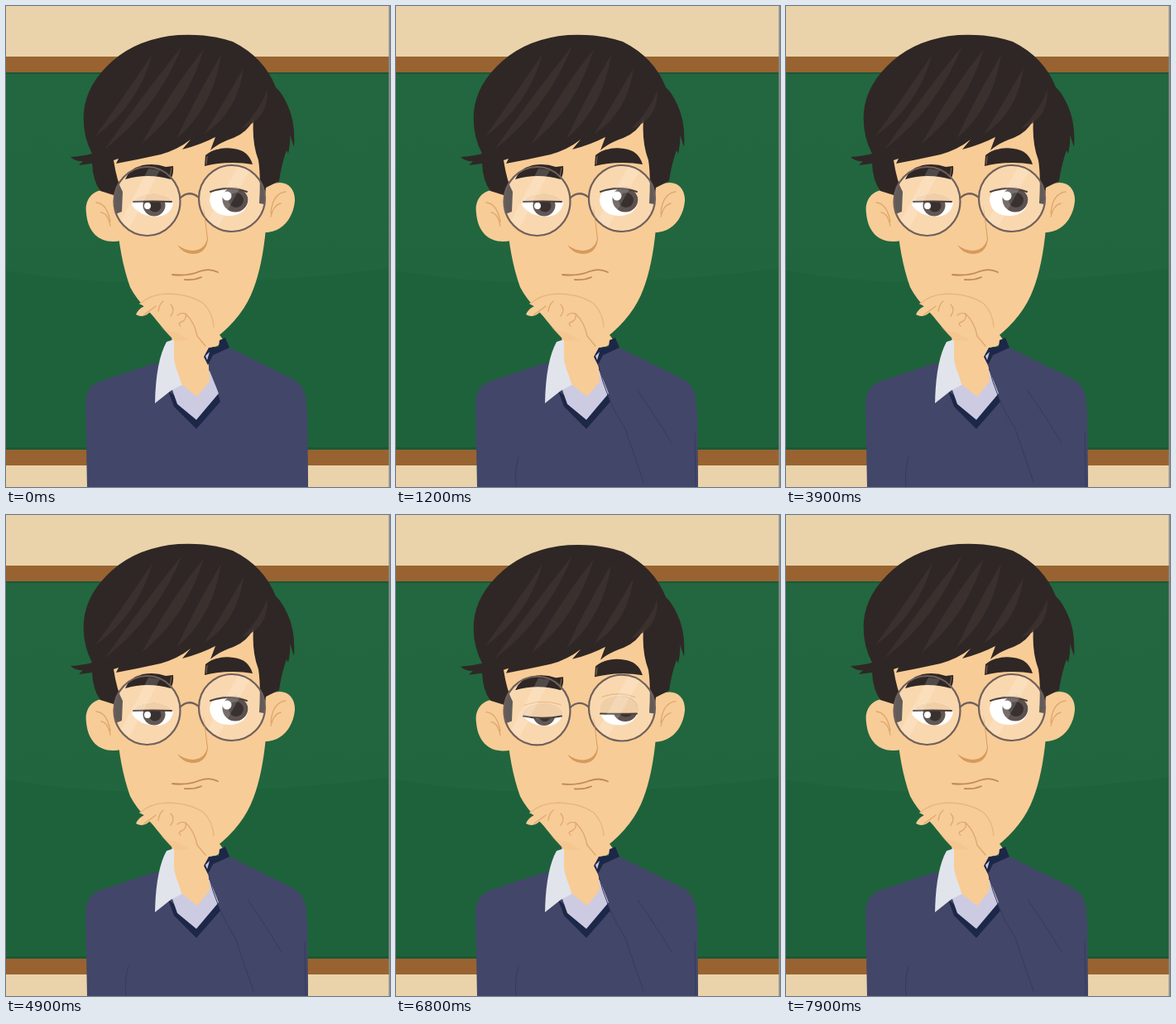
These frames come from a looping animation (464 px wide and 580 px high, 8000 ms). An HTML page:

```html
<!DOCTYPE html>
<html lang="en">
<head>
<meta charset="utf-8">
<title>Thinking</title>
<style>
  html, body { margin: 0; width: 100%; height: 100%; overflow: hidden; background: #ead3aa; }
  svg { display: block; width: 100vw; height: 100vh; }
  .line { fill: none; stroke: #c08a55; stroke-width: 1.8; stroke-linecap: round; stroke-linejoin: round; }
  .soft { stroke: #dfa970; stroke-width: 1.4; }
  .skin { fill: #f8cc96; }
  .hair { fill: #2f2725; }
  .knit { fill: #424669; }
  .navy { fill: #1d2748; }
  .seam { fill: none; stroke: #363a5b; stroke-width: 1; stroke-linecap: round; }
  .lens { fill: #fff; opacity: .24; }
  .rim { fill: none; stroke: #6f605c; stroke-width: 2.2; }
  .glare { fill: #fff; opacity: .16; }
</style>
</head>
<body>
<svg viewBox="0 0 464 580" preserveAspectRatio="none">
  <defs>
    <linearGradient id="board" x2="0" y2="1">
      <stop offset="0" stop-color="#22673f"/>
      <stop offset="1" stop-color="#20643d"/>
    </linearGradient>
    <clipPath id="clipL"><path d="M152 240Q155 227 178 226Q198 227 202 238Q198 255 178 254Q160 252 152 240Z"/></clipPath>
    <clipPath id="clipR"><path d="M246 234Q246 218 269 217Q290 218 293 234Q290 253 269 253Q248 252 246 234Z"/></clipPath>
  </defs>

  <g id="room">
    <path fill="#ead3aa" d="M0 0H464V580H0Z"/>
    <path fill="#986331" d="M0 61H464V80H0ZM0 534H464V554H0Z"/>
    <path fill="url(#board)" d="M0 80H464V535H0Z"/>
    <path fill="#1e623b" d="M0 319Q90 334 180 334Q330 334 464 316V535H0Z"/>
    <path fill="#1c5837" d="M0 80H464V82H0ZM0 532H464V535H0Z"/>
    <path fill="#8b928c" d="M462.500 0H464V580H462.500Z"/>
  </g>

  <g id="body">
    <path class="knit" d="M98 580L96 478Q97 460 112 453L182 430L205 445H243V425L266 411L345 449Q361 457 363 476L365 580Z"/>
    <path class="navy" d="M196 464L203 483L230 510L259 477L252 455L230 490Z"/>
    <path fill="#cccbe2" d="M201 463L206 440H246L257 467L230 499L207 480Z"/>
    <path class="skin" d="M200 385H254L244 420L246 452L231 471L212 456L201 426Z"/>
    <path fill="#e2e4ec" d="M203 402L194 405Q181 428 180 479L199 464L214 456Q204 437 203 425Z"/>
  </g>

  <g id="head">
    <path class="skin" d="M138 226C110 214 94 230 97 250C99 273 113 288 139 283ZM309 223C330 204 350 214 349 235C347 258 331 275 309 273Z"/>
    <path class="line soft" d="M109 237Q122 238 126 260M115 249Q123 250 126 265M338 224Q322 226 320 250M332 238Q323 240 320 254"/>
    <path class="skin" d="M129 170L134 255Q137 303 150 339Q164 366 203 394Q225 405 254 400Q287 374 299 341Q310 312 314 268L312 130L180 120Z"/>
    <path class="hair" d="M104 178Q93 181 78 182Q84 188 93 187L88 192L104 190Q105 211 114 223L130 228L132 251L140 248L141 224Q134 212 130 186L136 184L133 190Q160 185 187 179Q208 173 223 161L213 173Q236 167 253 158L247 174Q257 165 275 159Q292 152 299 137Q297 165 305 186Q308 205 306 238L312 239L314 219L330 211Q333 190 339 174L341 178Q344 164 343 155L348 170Q350 140 340 119Q333 104 326 98Q312 62 274 43Q245 33 208 35Q160 39 129 66Q97 94 94 128Q92 155 104 178Z"/>
    <g id="strands" fill="#3c3230" opacity=".85"></g>

    <ellipse class="lens" cx="170.500" cy="235.500" rx="40" ry="41.500"/>
    <ellipse class="lens" cx="273" cy="232" rx="40" ry="40"/>
    <g id="brows">
      <path class="hair" d="M144 209Q149 196 165 192Q180 189 193 194L202 193Q203 202 199 209Q171 201 144 209Z"/>
      <path class="hair" d="M240 193L241 180Q255 169 275 172Q293 174 298 191Q270 186 240 193Z"/>
      <path fill="none" stroke="#77614e" stroke-width="1.200" d="M243 181L242 191M200 195L198 206"/>
    </g>

    <g clip-path="url(#clipL)">
      <path fill="#fff" d="M140 220H210V260H140Z"/>
      <circle cx="179" cy="240" r="13.500" fill="#635855"/>
      <circle cx="180" cy="241" r="7.500" fill="#383130"/>
      <circle cx="171" cy="241" r="4" fill="#fff"/>
      <path id="lidL" fill="#f0cfa8"/>
    </g>
    <g clip-path="url(#clipR)">
      <path fill="#fff" d="M240 210H300V260H240Z"/>
      <circle cx="277" cy="233" r="15.500" fill="#5d524f"/>
      <circle cx="278" cy="234" r="9" fill="#383130"/>
      <circle cx="267" cy="229" r="5.500" fill="#fff"/>
      <path id="lidR" fill="#f0cfa8"/>
    </g>
    <g fill="none" stroke="#4d403c" stroke-width="2" stroke-linecap="round">
      <path id="lashL"/>
      <path id="lashR"/>
    </g>
    <path id="folds" class="line soft" d="M155 229Q176 221 199 228M249 219Q268 211 289 219"/>

    <path class="glare" d="M172 196L186 198L149 268L139 259ZM281 193L294 199L256 267L244 258Z"/>
    <ellipse class="rim" cx="170.500" cy="235.500" rx="40" ry="41.500"/>
    <ellipse class="rim" cx="273" cy="232" rx="40" ry="40"/>
    <path class="rim" d="M210 232Q221 221 233 231"/>

    <path fill="#d69a5c" d="M238 239Q242 263 244 281Q242 299 225 299Q213 298 207 288Q216 295 226 295Q240 294 243 281Z"/>
    <path class="line" d="M201 324Q220 326 234 320Q246 316 256 321M216 330Q227 331 236 327"/>
  </g>

  <g id="hand">
    <path class="skin" d="M157 372Q160 365 167 362L161 359Q173 348 194 347Q222 347 239 359Q250 370 251 387L262 402Q258 411 250 411L243 415L246 453L231 471L212 456L203 425V403Q190 390 174 369Q166 377 157 372Z"/>
    <path fill="#efba86" opacity=".35" d="M186 386Q195 394 205 393L222 403L204 404Z"/>
    <path class="line soft" opacity=".6" d="M162 359Q174 348 194 347Q222 347 239 359Q250 370 251 387"/>
    <path class="line soft" d="M167 372L181 362M184 368Q185 360 190 356M199 360Q205 366 199 374M207 373Q211 369 217 371Q219 378 212 381Q207 383 211 386M218 372Q228 382 231 398L241 410"/>
  </g>

  <g id="arm">
    <path class="knit" d="M268 411L345 449L364 490L365 580H306Q270 520 258 470L244 428Z"/>
    <path class="navy" d="M258 403L265 400L270 412L250 421L244 433L239 423L245 412L257 411Z"/>
    <path fill="#c8c7e3" d="M246 417L243 427L241 422Z"/>
    <path id="seams" class="seam" d="M244 431Q254 475 277 510L299 574M292 464Q312 492 333 527M145 580Q143 560 148 544M361 515L362 580"/>
  </g>
</svg>

<script>
const LOOP = 8000, STEP = 100;
const BLINKS = [2700, 6800];
const LID = [.6, .95, 1, 1, .75, .4, .12, 0, 0];
const NOD = [.45, .8, 1, 1, .8, .55, .3, .12, 0];
const PIVOT = 400;
const $ = id => document.getElementById(id);

// Each lock: root x, y, then tip x, y, and the width of its curve.
const LOCKS = [
  [177, 58, 108, 157, 15], [213, 48, 119, 173, 17], [239, 52, 164, 166, 20],
  [260, 59, 206, 160, 18], [287, 75, 239, 155, 15], [316, 101, 284, 148, 11]
];
$('strands').innerHTML = LOCKS.map(([x, y, u, v, w]) => {
  const mx = (x + u) / 2 + 17, my = (y + v) / 2 + 13;
  return `<path d="M${x} ${y}Q${mx} ${my} ${u} ${v}Q${mx - w} ${my - w} ${x} ${y}Z"/>`;
}).join('');

// Eye corners, lash height when open and shut, and bend of the lash.
const EYES = [
  { side: 'L', a: 154, b: 200, open: 236, shut: 246, bend: [-1, 8] },
  { side: 'R', a: 247, b: 291, open: 224, shut: 249, bend: [-8, 6] }
];

const mix = (a, b, p) => a + (b - a) * p;

function drawEye({ side, a, b, open, shut, bend }, p) {
  const y = mix(open, shut, p), c = y + mix(...bend, p), mid = (a + b) / 2;
  const lash = `${a} ${y}Q${mid} ${c} ${b} ${y}`;
  $('lid' + side).setAttribute('d', `M${a - 5} 200V${y}L${lash}H${b + 5}V200Z`);
  $('lash' + side).setAttribute('d', 'M' + lash);
}

function draw(t) {
  let lid = 0, nod = 0;
  for (const start of BLINKS) {
    const i = Math.floor((t - start) / STEP);
    if (i >= 0 && i < LID.length) [lid, nod] = [LID[i], NOD[i]];
  }
  const s = 1 - .0082 * nod;
  $('head').setAttribute('transform', `translate(0 ${PIVOT * (1 - s)}) scale(1 ${s})`);
  $('brows').setAttribute('transform', `translate(0 ${3.5 * nod})`);
  EYES.forEach(e => drawEye(e, lid));
  $('folds').setAttribute('opacity', Math.min(.8, lid));
  $('seams').setAttribute('opacity', Math.min(1, Math.floor(t / STEP) / 8));
}

const t0 = performance.now();
function tick(now) {
  draw(Math.max(0, now - t0) % LOOP);
  requestAnimationFrame(tick);
}
draw(0);
requestAnimationFrame(tick);
</script>
</body>
</html>
```
